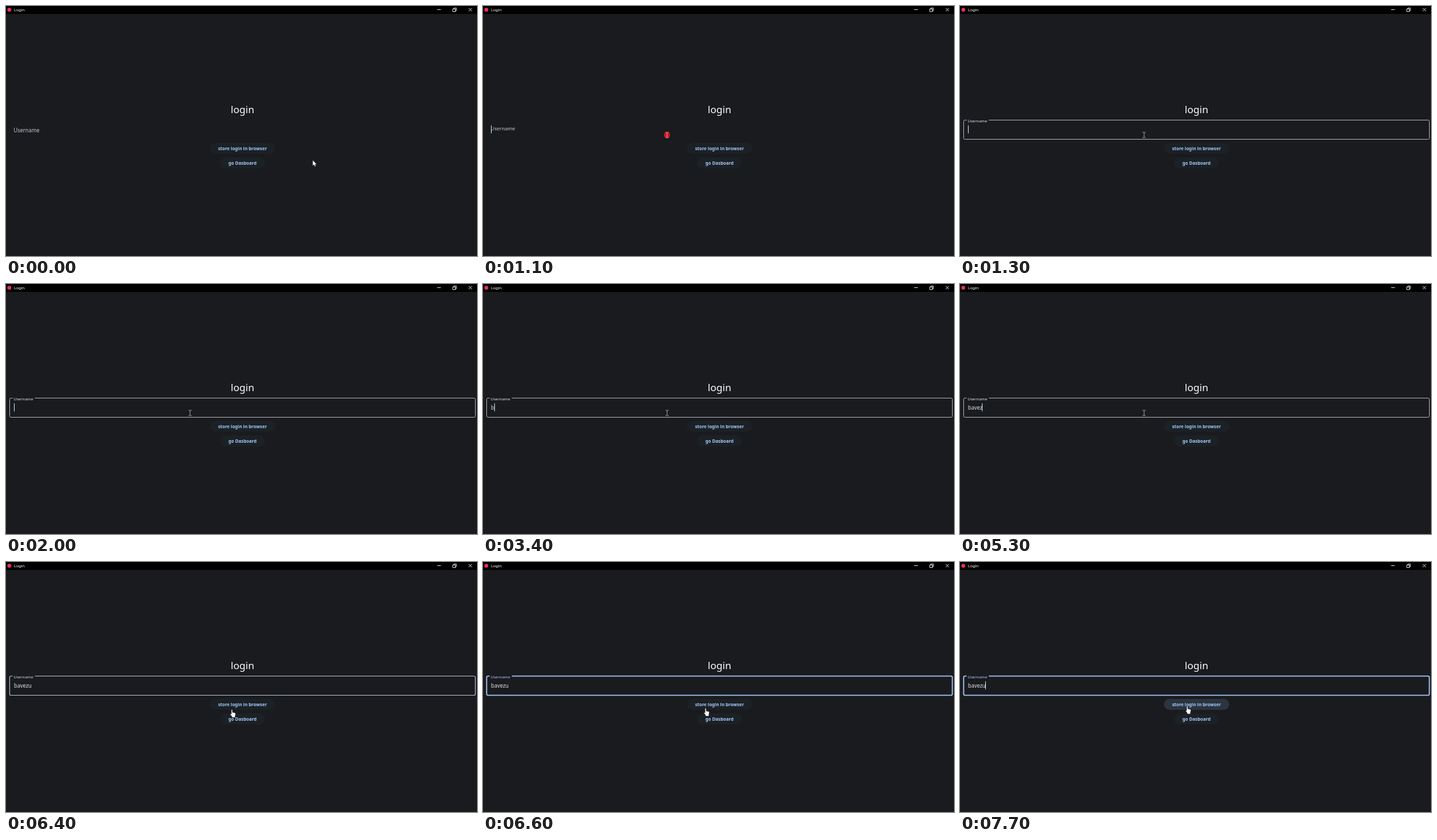
Animation of 710 by 378 pixels, one loop 8 s. Source, as an HTML page:

```html
<!DOCTYPE html>
<html lang="en">
<head>
<meta charset="utf-8">
<title>Login</title>
<style>
  html, body { margin: 0; width: 100%; height: 100%; overflow: hidden; background: #1a1b1f; }
  svg { display: block; width: 710px; height: 378px; font-family: "Noto Sans", "Open Sans", sans-serif; }
  .line { fill: none; }
  .action { font-size: 6.75px; font-weight: 700; fill: #a8c9fc; text-anchor: middle; }
</style>
</head>
<body>
<svg viewBox="0 0 710 378">
  <rect width="710" height="12"/>
  <circle cx="5" cy="5.7" r="2.9" fill="#e8305f"/>
  <text x="12" y="8.3" font-size="6.1" fill="#fff">Login</text>
  <path class="line" stroke="#ddd" stroke-width=".9" d="M650 5.5h5.500M673.500 4.500h4v4h-4zM675 4.500v-1.500h4v4h-1.500M697.500 3l5 5m0-5l-5 5"/>

  <text x="356.5" y="161.7" font-size="15" fill="#fff" text-anchor="middle">login</text>

  <path id="border" class="line" d="M10 172.5H7.5q-2 0-2 2v25q0 2 2 2H705.5q2 0 2-2v-25q0-2-2-2H43.5"/>
  <text id="label" font-size="8">Username</text>
  <text id="typed" x="12" y="190.3" font-size="8" fill="#e2e2e5"></text>
  <rect id="caret" y="180.5" width="1" height="12" fill="#b8d6ff"/>

  <rect id="store" x="307.5" y="207" width="98.5" height="16.5" rx="8.2"/>
  <rect x="322.5" y="229" width="68" height="16.5" rx="8.2" fill="#1b2125"/>
  <text class="action" x="356.5" y="218">store login in browser</text>
  <text class="action" x="356.5" y="239.7">go Dasboard</text>

  <g id="pointer">
    <path id="arrow" d="M-2.7-5v8.6l2-1.7 1.400 3.100 1.500-.7-1.400-2.900h2.700z" fill="#fff" stroke="#000" stroke-width=".4"/>
    <g id="beam">
      <circle id="press" r="4.7" fill="#d3151f"/>
      <path class="line" stroke="#c8c8c8" stroke-width=".7" d="M-2.3-4H-.5L.2-3.500.9-4H2.700M.2-3.500V3.500M-2.300 4H-.5L.2 3.500.9 4H2.700"/>
    </g>
    <path id="hand" d="M-2.3-5.3q.9-1.200 1.700 0v3.500l3.500.8q1.400.4 1.200 1.700L3.400 4v2h-5V4.500L-4 1.300q0-1.500 1.700-.3z" fill="#fff" stroke="#000" stroke-width=".4"/>
  </g>
</svg>
<script>
const LOOP = 8000, STEP = 100;
const NAME = "bavezu";
const KEY_TIMES = [3400, 3900, 4500, 5000, 5300, 5800];
const BLINKS = [1100, 1600, 2000, 2600, 3000, 6200, 6700, 7200, 7700];
const GREY = [162, 164, 169], PALE = [226, 226, 229], BLUE = [168, 203, 252];
// time, x, y, shape
const MOVES = [
  [0, 465, 238, "arrow"], [600, 420, 228, "arrow"], [700, 305, 200, "beam"], [800, 277.3, 195, "beam"],
  [6000, 347, 230, "hand"], [6400, 342, 229, "hand"], [6500, 339, 228, "hand"],
  [6600, 337, 227, "hand"], [6700, 341, 225, "hand"], [6800, 344, 223.7, "hand"]
];

const $ = id => document.getElementById(id);
const set = (id, attrs) => {
  for (const key in attrs) $(id).setAttribute(key, attrs[key]);
};
const show = (id, on) => set(id, { visibility: on ? "visible" : "hidden" });
const passed = (times, t) => times.filter(time => time <= t).length;
const mix = (a, b, p) => a + (b - a) * p;
const ramp = (t, from, to) => Math.min(1, Math.max(0, (t - from) / (to - from)));
const blend = (a, b, p) => `rgb(${a.map((v, i) => Math.round(mix(v, b[i], p)))})`;

function drawField(t) {
  const lift = t < 1100 ? 0 : t < 1200 ? .2 : t < 1300 ? .75 : 1;
  const blue = ramp(t, 6300, 6600);
  set("label", {
    transform: `translate(11.6 ${mix(190.5, 175.7, lift)}) scale(${mix(1, .75, lift)})`,
    fill: lift < 1 ? "#c3c7cf" : blend(PALE, BLUE, blue)
  });
  set("border", {
    opacity: ramp(lift, .3, 1),
    stroke: blend(GREY, BLUE, blue),
    "stroke-width": mix(1, 1.6, blue)
  });

  const count = passed(KEY_TIMES, t);
  $("typed").textContent = NAME.slice(0, count);
  const width = count ? $("typed").getComputedTextLength() : 0;
  set("caret", { x: Math.round(11.6 + width) });
  show("caret", passed(BLINKS, t) % 2);
}

function drawPointer(t) {
  const [, x, y, shape] = MOVES[passed(MOVES.map(move => move[0]), t) - 1];
  set("pointer", { transform: `translate(${x} ${y})` });
  for (const id of ["arrow", "beam", "hand"]) show(id, id === shape);
  show("press", t >= 1000 && t < 1300);
  set("store", { fill: blend([27, 33, 37], [43, 52, 64], ramp(t, 6600, 6900)) });
}

function frame() {
  const t = Math.floor(performance.now() % LOOP / STEP) * STEP;
  drawField(t);
  drawPointer(t);
  requestAnimationFrame(frame);
}
frame();
</script>
</body>
</html>
```
